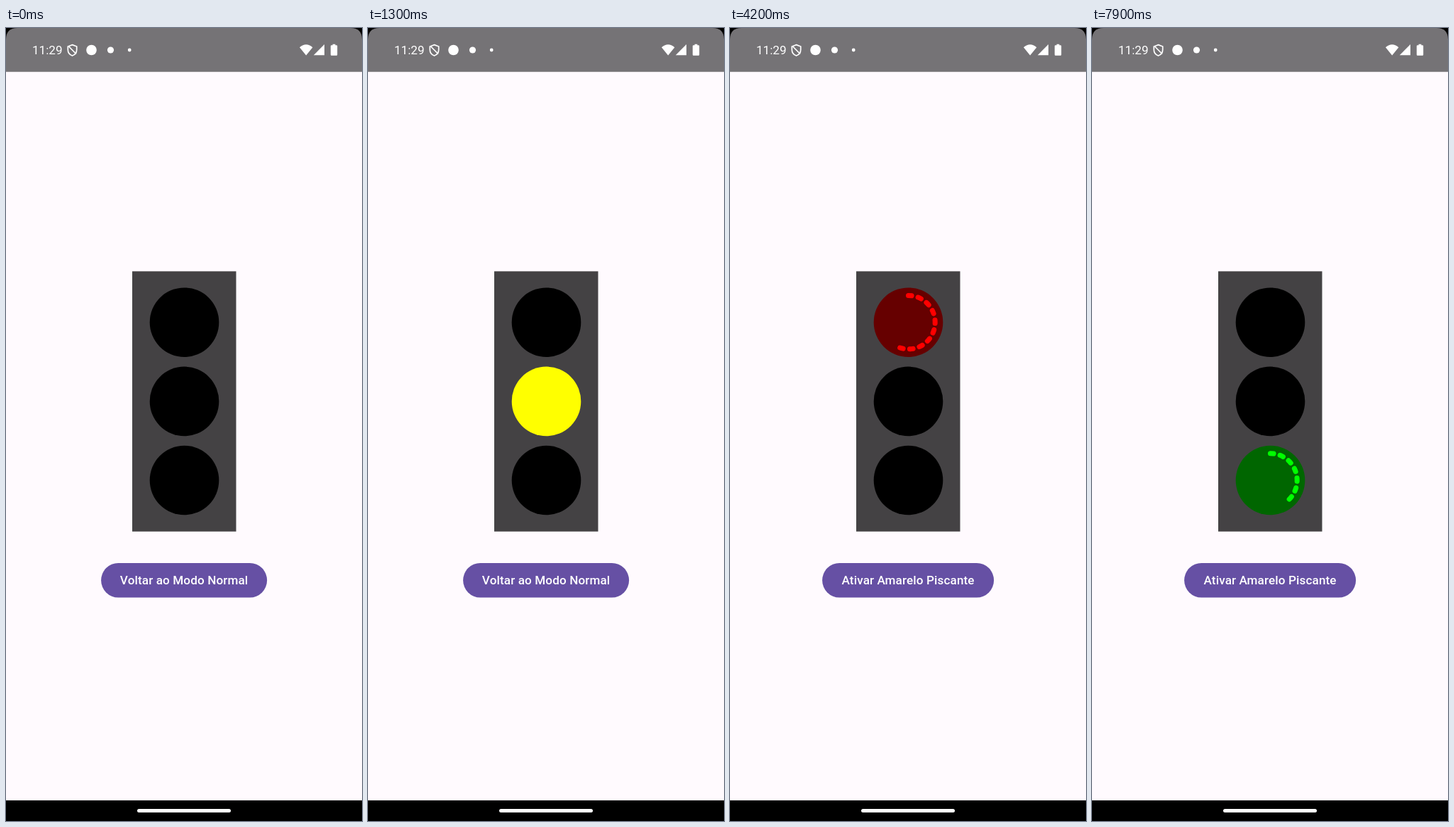
Recreate the animation shown at these times as an HTML page. Size 502x1116 px, loop 8 s.

```html
<!DOCTYPE html>
<html lang="pt">
<head>
<meta charset="utf-8">
<title>Semáforo</title>
<style>
  html, body { margin: 0; width: 100%; height: 100%; overflow: hidden; background: #000; }
  svg { display: block; }
  text { font: 17.1px Roboto, sans-serif; fill: #fff; }
  #label { font-weight: 500; letter-spacing: .12px; text-anchor: middle; }
  #arc { fill: none; stroke-width: 7; stroke-linecap: round; stroke-dasharray: 4.65 9.3; }
</style>
</head>
<body>
<svg width="502" height="1116" viewBox="0 0 502 1116">
  <defs>
    <clipPath id="pill"><rect x="130" y="753" width="242" height="48.6" rx="24.3"/></clipPath>
  </defs>
  <rect width="502" height="1116"/>
  <path d="M0 61.5V16Q0 0 16 0H486Q502 0 502 16V61.5Z" fill="#757376"/>
  <rect y="61.5" width="502" height="1025.5" fill="#fffafe"/>

  <text x="37" y="37">11:29</text>
  <g fill="none" stroke="#fff" stroke-width="1.7">
    <path d="M93.5 23.6L99.7 26V30.5C99.7 34.6 97 37.8 93.5 39C90 37.8 87.3 34.6 87.3 30.5V26Z"/>
    <path d="M88 25.5L99 36.5"/>
  </g>
  <g fill="#fff">
    <circle cx="120.5" cy="31" r="7.3"/>
    <circle cx="147.5" cy="31" r="4.6"/>
    <circle cx="174.2" cy="31" r="2.4"/>
    <path d="M414 27.2Q423.2 19.3 432.4 27.2L423.2 38.4Z"/>
    <path d="M449 23V38.2H433.8Z"/>
    <path d="M460.6 24.2V22.8H464.4V24.2H466Q467.2 24.2 467.2 25.4V37.4Q467.2 38.7 466 38.7H459Q457.8 38.7 457.8 37.4V25.4Q457.8 24.2 459 24.2Z"/>
    <rect x="185" y="1099" width="132" height="5" rx="2.5"/>
  </g>

  <rect x="178" y="342.4" width="146.5" height="366.2" fill="#444244"/>
  <g id="lamps"></g>
  <path id="arc"/>

  <rect id="button" y="753" height="48.6" rx="24.3" fill="#6650a4"/>
  <g clip-path="url(#pill)"><circle id="ripple" cx="251" cy="777" fill="#fff"/></g>
  <text id="label" x="251.1" y="783"></text>
</svg>
<script>
const LOOP = 8000, CX = 251.5, RADIUS = 37.7;
const LAMP_Y = [414.2, 525.4, 636.5];
const BLINK_START = 200, BLINK = 500;
const NORMAL_START = 2330, GREEN_START = 5710;
const RED_TIME = 3380, GREEN_TIME = 5350;

const $ = id => document.getElementById(id);
const clamp = v => Math.min(1, Math.max(0, v));

const lamps = LAMP_Y.map(y => {
  const lamp = document.createElementNS('http://www.w3.org/2000/svg', 'circle');
  for (const [key, value] of Object.entries({ cx: CX, cy: y, r: 48.8 })) lamp.setAttribute(key, value);
  return $('lamps').appendChild(lamp);
});

function arcPath(cy, progress) {
  const a = Math.min(progress, .9999) * 2 * Math.PI;
  const x = CX + RADIUS * Math.sin(a), y = cy - RADIUS * Math.cos(a);
  return `M${CX} ${cy - RADIUS}A${RADIUS} ${RADIUS} 0 ${+(a > Math.PI)} 1 ${x} ${y}`;
}

function setLamps(...colors) {
  lamps.forEach((lamp, i) => lamp.setAttribute('fill', colors[i]));
}

function setButton(text, width) {
  $('label').textContent = text;
  $('button').setAttribute('x', 251.1 - width / 2);
  $('button').setAttribute('width', width);
}

function setArc(cy, color, progress) {
  $('arc').setAttribute('d', arcPath(cy, clamp(progress)));
  $('arc').setAttribute('stroke', color);
}

function drawRipple(t) {
  const grow = clamp((t - NORMAL_START) / 450);
  const fade = 1 - clamp((t - NORMAL_START - 400) / 350);
  $('ripple').setAttribute('r', 130 * Math.sqrt(grow));
  $('ripple').setAttribute('opacity', grow ? .1 * fade : 0);
}

function draw(t) {
  if (t < NORMAL_START) {
    const lit = t >= BLINK_START && Math.floor((t - BLINK_START) / BLINK) % 2 === 0;
    setLamps('#000', lit ? '#ff0' : '#000', '#000');
    setButton('Voltar ao Modo Normal', 234);
    $('arc').setAttribute('stroke', 'none');
  } else {
    setButton('Ativar Amarelo Piscante', 242);
    if (t < GREEN_START) {
      setLamps('#600', '#000', '#000');
      setArc(LAMP_Y[0], '#f00', (t - NORMAL_START) / RED_TIME);
    } else {
      setLamps('#000', '#000', '#060');
      setArc(LAMP_Y[2], '#0f0', (t - GREEN_START) / GREEN_TIME);
    }
  }
  drawRipple(t);
}

const start = performance.now();
function tick() {
  draw((performance.now() - start) % LOOP);
  requestAnimationFrame(tick);
}
tick();
</script>
</body>
</html>
```
